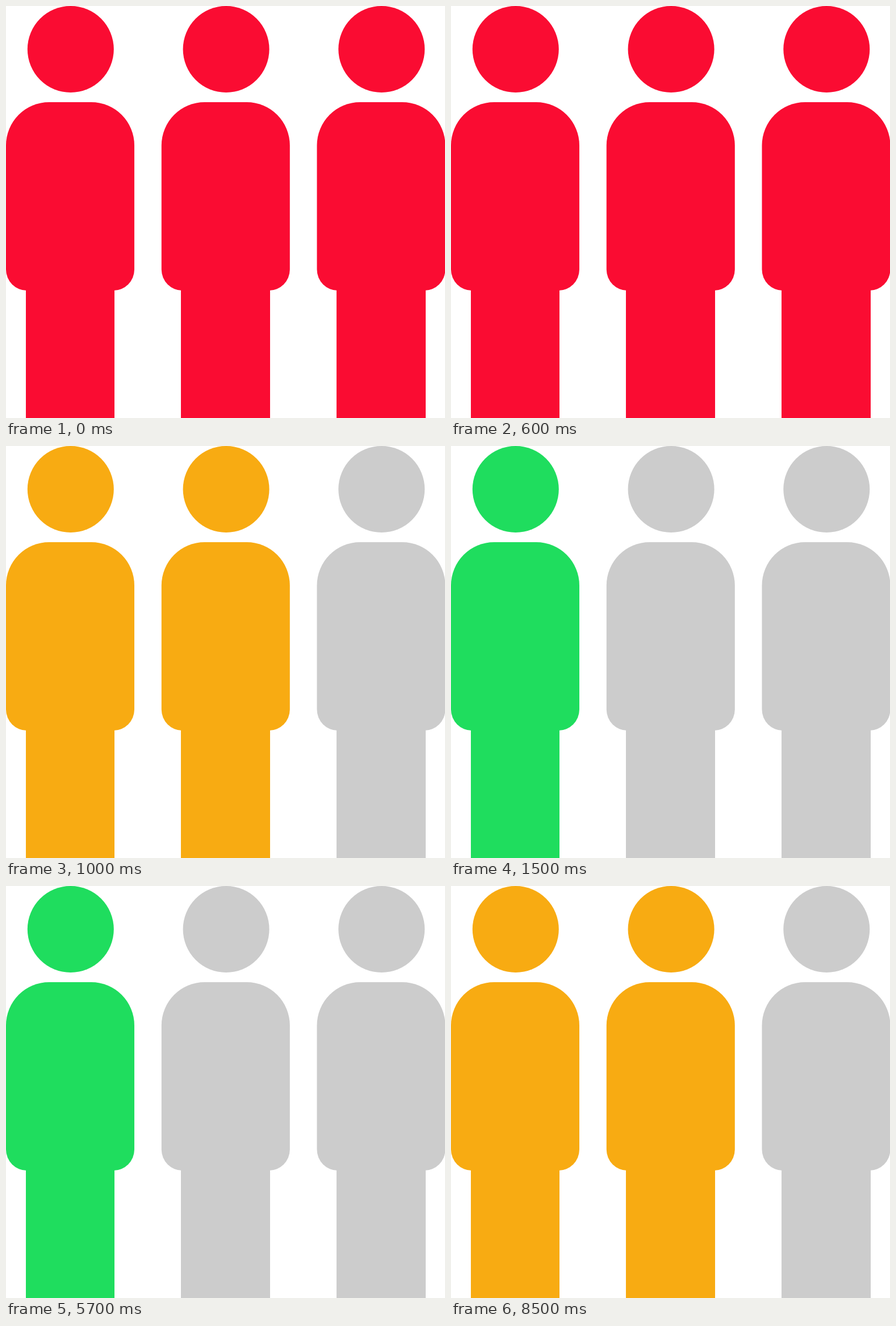
Write an HTML page with a canvas that moves like this. It is 773x724 px and loops after 8750 ms.

```html
<!DOCTYPE html>
<html lang="en">
<head>
<meta charset="utf-8">
<title>Three figures</title>
<style>
  html, body { margin: 0; width: 100%; height: 100%; overflow: hidden; background: #fff; }
  canvas { display: block; }
</style>
</head>
<body>
<canvas id="stage" width="773" height="724"></canvas>
<script>
const ctx = document.getElementById('stage').getContext('2d');

const RED = '#fa0c32', AMBER = '#f8ab12', GREEN = '#1fdd5e', GREY = '#cccccc';
const LOOP = 8750;
const LEFT = [0, 273.8, 547.5];

// Each state holds until its end time, with hard cuts between them.
const STATES = [
  { end: 1000, color: RED, lit: 3 },
  { end: 1500, color: AMBER, lit: 2 },
  { end: 8500, color: GREEN, lit: 1 },
  { end: LOOP, color: AMBER, lit: 2 }
];

function drawFigure(x, color) {
  ctx.fillStyle = color;
  ctx.beginPath();
  ctx.arc(x + 113.8, 76, 76, 0, Math.PI * 2);
  ctx.fill();
  ctx.beginPath();
  ctx.roundRect(x, 169, 226, 331, [76, 76, 37, 37]);
  ctx.fill();
  const legs = Math.round(x + 34.6);
  ctx.fillRect(legs, 480, Math.round(x + 191.2) - legs, 244);
}

function draw(time) {
  const { color, lit } = STATES.find(s => time < s.end);
  ctx.fillStyle = '#fff';
  ctx.fillRect(0, 0, 773, 724);
  LEFT.forEach((x, i) => drawFigure(x, i < lit ? color : GREY));
}

const start = performance.now();
function tick() {
  draw((performance.now() - start) % LOOP);
  requestAnimationFrame(tick);
}
tick();
</script>
</body>
</html>
```
